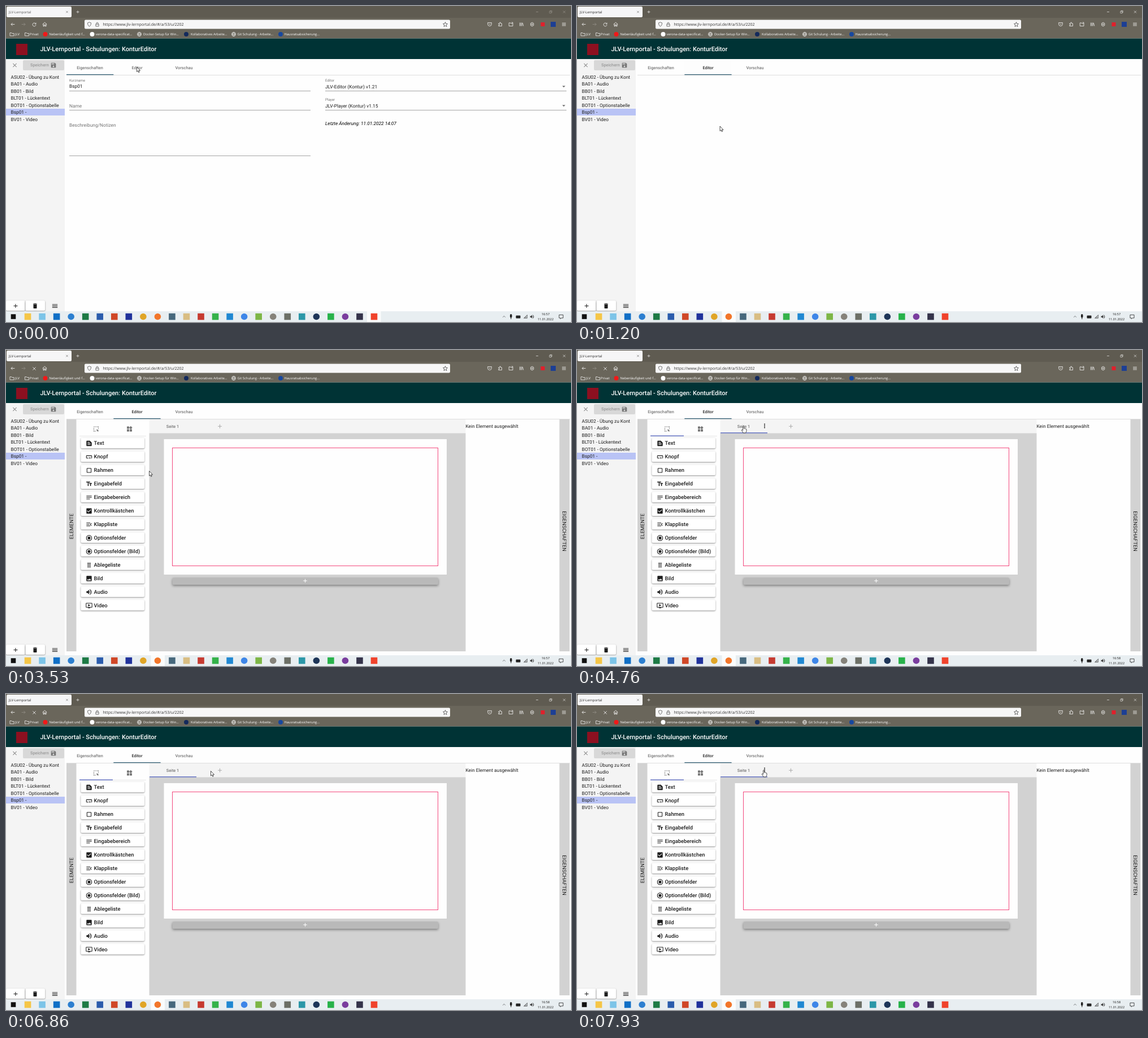
An HTML page with a canvas that plays this animation: 1000x560 px, repeating every 8 s.

```html
<!DOCTYPE html>
<html lang="de">
<head>
<meta charset="utf-8">
<title>JLV-Lernportal</title>
<style>
html, body { margin: 0; width: 100%; height: 100%; overflow: hidden; background: #fefefe; }
canvas { display: block; width: 1000px; height: 560px; }
</style>
</head>
<body>
<canvas id="stage" width="1000" height="560"></canvas>
<script>
const LOOP = 8000;
const ctx = document.getElementById('stage').getContext('2d');
const ROBOTO = 'Roboto, sans-serif';
const UI = '"Open Sans", sans-serif';
const GREY = '#757575', DARK = '#1d1d1d', STRIP = '#d2d2d2';

// Icon outlines on a 24 unit grid
const ICON = {
  close: 'M19 6.4L17.6 5 12 10.6 6.4 5 5 6.4 10.6 12 5 17.6 6.4 19 12 13.4 17.6 19 19 17.6 13.4 12z',
  save: 'M17 3H5c-1.1 0-2 .9-2 2v14c0 1.1.9 2 2 2h14c1.1 0 2-.9 2-2V7l-4-4zm-5 16c-1.66 0-3-1.34-3-3s1.34-3 3-3 3 1.34 3 3-1.34 3-3 3zm3-10H5V5h10v4z',
  trash: 'M6 19c0 1.1.9 2 2 2h8c1.1 0 2-.9 2-2V7H6v12zM19 4h-3.5l-1-1h-5l-1 1H5v2h14V4z',
  menu: 'M3 18h18v-2H3v2zm0-5h18v-2H3v2zm0-7v2h18V6H3z',
  add: 'M19 13h-6v6h-2v-6H5v-2h6V5h2v6h6v2z',
  text: 'M20.4 8.4l-4.8-4.8c-.4-.4-.9-.6-1.4-.6H5c-1.1 0-2 .9-2 2v14c0 1.1.9 2 2 2h14c1.1 0 2-.9 2-2V9.8c0-.5-.2-1-.6-1.4zM7 7h7v2H7V7zm10 10H7v-2h10v2zm0-4H7v-2h10v2z',
  button: 'M22 9v6c0 1.1-.9 2-2 2h-1v-2h1V9H4v6h6v2H4c-1.1 0-2-.9-2-2V9c0-1.1.9-2 2-2h16c1.1 0 2 .9 2 2zM14.5 19l1.1-2.4 2.4-1.1-2.4-1.1-1.1-2.4-1.1 2.4-2.4 1.1 2.4 1.1z',
  frame: 'M18 4H6c-1.1 0-2 .9-2 2v12c0 1.1.9 2 2 2h12c1.1 0 2-.9 2-2V6c0-1.1-.9-2-2-2zm0 14H6V6h12v12z',
  field: 'M2.5 4v3h5v12h3V7h5V4h-13zm19 5h-9v3h3v7h3v-7h3V9z',
  area: 'M3 18h12v-2H3v2zM3 6v2h18V6H3zm0 7h18v-2H3v2z',
  check: 'M19 3H5c-1.1 0-2 .9-2 2v14c0 1.1.9 2 2 2h14c1.1 0 2-.9 2-2V5c0-1.1-.9-2-2-2zm-9 14l-5-5 1.4-1.4L10 14.2l7.6-7.6L19 8l-9 9z',
  list: 'M3 18h13v-2H3v2zM3 6v2h13V6H3zm0 7h10v-2H3v2zm18 2.6L17.4 12 21 8.4 19.6 7l-5 5 5 5z',
  radio: 'M12 7c-2.76 0-5 2.24-5 5s2.24 5 5 5 5-2.24 5-5-2.24-5-5-5zm0-5C6.48 2 2 6.48 2 12s4.48 10 10 10 10-4.48 10-10S17.52 2 12 2zm0 18c-4.42 0-8-3.58-8-8s3.58-8 8-8 8 3.58 8 8-3.58 8-8 8z',
  drop: 'M7 4h4v4H7zM13 4h4v4h-4zM7 10h4v4H7zM13 10h4v4h-4zM7 16h4v4H7zM13 16h4v4h-4z',
  image: 'M21 19V5c0-1.1-.9-2-2-2H5c-1.1 0-2 .9-2 2v14c0 1.1.9 2 2 2h14c1.1 0 2-.9 2-2zM8.5 13.5l2.5 3L14.5 12l4.5 6H5z',
  audio: 'M3 9v6h4l5 5V4L7 9H3zm13.5 3c0-1.8-1-3.3-2.5-4v8c1.5-.7 2.5-2.2 2.5-4zM14 3.2v2.1c2.9.9 5 3.5 5 6.7s-2.1 5.8-5 6.7v2.1c4-.9 7-4.5 7-8.8s-3-7.9-7-8.8z',
  video: 'M21 3H3c-1.1 0-2 .9-2 2v12c0 1.1.9 2 2 2h5v2h8v-2h5c1.1 0 2-.9 2-2V5c0-1.1-.9-2-2-2zm0 14H3V5h18v12zm-5-6l-7 4V7z',
  widgets: 'M13 13v8h8v-8h-8zM3 21h8v-8H3v8zM3 3v8h8V3H3zm13.7-1.3L11 7.3l5.7 5.7 5.6-5.7z',
  select: 'M3 3h3v2H3zM8 3h3v2H8zM13 3h3v2h-3zM18 3h3v3h-3zM3 8h2v3H3zM3 13h2v3H3zM3 18h3v3H3zM8 19h3v2H8zM19 8h2v3h-2zM13 13l9 3-3.5 1.5 3 3-1.2 1.2-3-3L16 22z',
  more: 'M10 4h4v4h-4zM10 10h4v4h-4zM10 16h4v4h-4z'
};
// Line icons on the same grid
const LINE = {
  back: 'M21 12H4M11 5l-7 7 7 7',
  forward: 'M3 12h17M13 5l7 7-7 7',
  reload: 'M19 8A8 8 0 1 0 20 13M20 3v6h-6',
  cross: 'M5 5l14 14M19 5L5 19',
  home: 'M3 12L12 4l9 8M6 10v10h4v-6h4v6h4V10',
  shield: 'M12 2l8 3c0 8-2 13-8 17C6 18 4 13 4 5z',
  lock: 'M5 11h14v10H5zM8 11V7a4 4 0 0 1 8 0v4',
  star: 'M12 2l3 7 7 .6-5.400 4.800L18.300 22 12 18 5.700 22l1.700-7.600L2 9.600 9 9z',
  pocket: 'M3 4h18v7a9 9 0 0 1-18 0zM8 9l4 4 4-4',
  puzzle: 'M4 8h5V5a2 2 0 0 1 5 0v3h5v12H4v-4h2a2 2 0 0 0 0-5H4z',
  box: 'M3 5h7l2 3h9v12H3zM15 3h6v5',
  books: 'M4 4v16M9 4v16M14 4v16M17 5l4 15',
  gear: 'M12 3l7 4v10l-7 4-7-4V7zM9 12a3 3 0 1 0 6 0a3 3 0 1 0-6 0',
  burger: 'M3 6h18M3 12h18M3 18h18',
  globe: 'M2 12a10 10 0 1 0 20 0a10 10 0 1 0-20 0M2 12h20M12 2C6 8 6 16 12 22C18 16 18 8 12 2',
  folder: 'M2 5h8l2 3h10v12H2z',
  plus: 'M12 4v16M4 12h16',
  minus: 'M4 12h16',
  restore: 'M4 8h12v12H4zM8 8V4h12v12h-4',
  up: 'M4 16l8-8 8 8',
  wifi: 'M3 20L21 3v17zM9 20v-6M15 20V9',
  note: 'M3 4h18v14h-8l-4 4v-4H3z'
};
const shapes = {};
const shape = d => shapes[d] || (shapes[d] = new Path2D(d));

function rect(x, y, w, h, color) {
  ctx.fillStyle = color;
  ctx.fillRect(x, y, w, h);
}
function round(x, y, w, h, r, color) {
  ctx.fillStyle = color;
  ctx.beginPath();
  ctx.roundRect(x, y, w, h, r);
  ctx.fill();
}
function dot(x, y, r, color) {
  ctx.fillStyle = color;
  ctx.beginPath();
  ctx.arc(x, y, r, 0, 7);
  ctx.fill();
}
// Text whose capitals are centred on y
function label(s, x, y, size, color, style = '400', family = ROBOTO, align = 'left') {
  ctx.font = `${style} ${size}px ${family}`;
  ctx.textAlign = align;
  ctx.fillStyle = color;
  ctx.fillText(s, x, y + size * 0.36);
}
function icon(name, x, y, size, color, width = 2) {
  ctx.save();
  ctx.translate(x - size / 2, y - size / 2);
  ctx.scale(size / 24, size / 24);
  if (ICON[name]) {
    ctx.fillStyle = color;
    ctx.fill(shape(ICON[name]));
  } else {
    ctx.strokeStyle = color;
    ctx.lineWidth = width;
    ctx.stroke(shape(LINE[name]));
  }
  ctx.restore();
}
function shadow(blur, dy, alpha) {
  ctx.shadowColor = `rgba(0,0,0,${alpha})`;
  ctx.shadowBlur = blur;
  ctx.shadowOffsetY = dy;
}
function raised(x, y, w, h, color) {
  ctx.save();
  shadow(2.5, 1, 0.45);
  round(x, y, w, h, 2, color);
  ctx.restore();
}
const clamp = v => Math.min(1, Math.max(0, v));
const smooth = v => v < 0.5 ? 4 * v ** 3 : 1 - (2 - 2 * v) ** 3 / 2;

function browser(t) {
  const active = t >= 400, ctl = active ? '#fff' : '#a5a199';
  rect(0, 0, 1000, 21, '#5f5b51');
  rect(0, 21, 1000, 36.5, '#6a665b');
  round(1, 1, 115, 19, 2, '#f6f6f7');
  label('JLV-Lernportal', 5, 10.5, 6, active ? '#222' : '#555', '400', UI);
  icon('cross', 108, 10.5, 6, '#333');
  icon('plus', 127, 10.5, 7.5, '#fff');
  icon('minus', 940, 10.5, 6, ctl, 2.500);
  icon('restore', 964, 10.5, 6.5, ctl);
  icon('cross', 988, 10.5, 7, ctl);

  icon('back', 12, 32.5, 9, '#fff');
  icon('forward', 31, 32.5, 9, '#96928a');
  icon(t < 2500 ? 'reload' : 'cross', 50, 33, 9, '#fff');
  icon('home', 68.5, 32.5, 10, '#fff');
  round(139, 24.5, 647, 16, 2, '#f7f7f7');
  icon('shield', 147.5, 32.5, 9, '#444');
  icon('lock', 161.5, 32.5, 9, '#444');
  label('https://www.jlv-lernportal.de/#/a/53/u/2202', 171.5, 32.8, 7, '#333', '400', UI);
  icon('star', 777.5, 32.5, 9.5, '#444');
  ['pocket', 'puzzle', 'box', 'books', 'gear'].forEach((n, i) => icon(n, 856 + i * 18.8, 32.5, 9, '#fff'));
  rect(946.5, 29, 7, 7, '#e0202c');
  rect(964, 28, 9, 9, '#1d3f94');
  icon('burger', 987.5, 32.5, 9, '#fff');

  const marks = [
    [10.5, 16, 'JLV', 'folder'], [37, 42, 'Privat', 'folder'],
    [69.5, 76.5, 'Nebenläufigkeit und f...', '#f21818'],
    [152.5, 158.5, 'verona-data-specificat...', '#fff'],
    [236, 243, 'Docker-Setup für Win...', 'globe'],
    [319, 327, 'Kollaboratives Arbeite...', '#142a5c'],
    [403, 409.5, 'Git Schulung - Arbeite...', 'globe'],
    [486, 492.5, 'Hausratsabsicherung...', '#17479e']
  ];
  for (const [ix, tx, name, mark] of marks) {
    if (LINE[mark]) icon(mark, ix, 50, 8.5, '#fff');
    else dot(ix, 50, 4, mark);
    label(name, tx, 50.3, 5.85, '#fff', '400', UI);
  }
}

function header() {
  rect(0, 57.5, 1000, 36.5, '#003335');
  rect(18, 67, 20, 20, '#8c1020');
  label('JLV-Lernportal - Schulungen: KonturEditor', 60.5, 76, 11, '#fff', '500');
}

function sidebar() {
  rect(0, 94, 104, 447, '#f4f4f4');
  icon('close', 15.5, 105, 12, '#8b8b8b');
  round(30, 96, 73, 18, 2, '#d8d8d8');
  label('Speichern', 43, 104.8, 7.3, '#989898', '500');
  icon('save', 84, 105, 11.5, '#757575');
  rect(0, 182, 104, 12, '#b9c3f5');
  ['ASU02 - Übung zu Kont', 'BA01 - Audio', 'BB01 - Bild', 'BLT01 - Lückentext',
    'BOT01 - Optionstabelle', 'Bsp01 -', 'BV01 - Video']
    .forEach((s, i) => label(s, 8.5, 125.8 + i * 12.48, 8.33, DARK));
  raised(0, 522, 33.5, 18, '#fff');
  raised(34.5, 522, 34.5, 18, '#fff');
  icon('add', 17, 531.5, 12, DARK);
  icon('trash', 51.5, 531.5, 12, DARK);
  icon('menu', 86.5, 531.5, 12.5, DARK);
}

function tabs(t) {
  rect(107, 122, 891, 1, '#dedede');
  if (t > 400 && t < 1210) {
    const grow = 1 - (1 - clamp((t - 400) / 450)) ** 2.6;
    ctx.save();
    ctx.beginPath();
    ctx.rect(190, 97, 83.5, 25);
    ctx.clip();
    dot(231.5, 110, 44 * grow, `rgba(0,0,0,${0.11 * (1 - clamp((t - 850) / 360))})`);
    ctx.restore();
  }
  label('Eigenschaften', 148.5, 109.5, 7.3, GREY, '500', ROBOTO, 'center');
  label('Editor', 232, 109.5, 7.3, t < 400 ? GREY : '#2a2a2a', '500', ROBOTO, 'center');
  label('Vorschau', 315, 109.5, 7.3, GREY, '500', ROBOTO, 'center');
  rect(107 + 83.3 * smooth(clamp((t - 545) / 500)), 121, 83.3, 1.2, '#2c5a70');
}

function form() {
  const line = (x, y) => rect(x, y, 427, 0.8, '#8e8e8e');
  label('Kurzname', 112, 131.3, 6.25, GREY);
  label('Bsp01', 112, 142.5, 8.33, DARK);
  label('Name', 112, 176.8, 8.33, GREY);
  label('Beschreibung/Notizen', 112, 210.6, 8.33, GREY);
  [150.3, 184.3, 265].forEach(y => line(112, y));
  [['Editor', 'JLV-Editor (Kontur) v1.21'], ['Player', 'JLV-Player (Kontur) v1.15']].forEach(([a, b], i) => {
    const y = i * 34;
    label(a, 565, 131.3 + y, 6.25, GREY);
    label(b, 565, 143 + y, 8.33, DARK);
    line(565, 150.3 + y);
    ctx.fillStyle = '#666';
    ctx.beginPath();
    ctx.moveTo(984.5, 141.5 + y);
    ctx.lineTo(990, 141.5 + y);
    ctx.lineTo(987.2, 144.3 + y);
    ctx.fill();
  });
  label('Letzte Änderung: 11.01.2022 14:07', 565, 208.5, 8.33, '#000', 'italic 400');
}

function upright(s, x, y, turn) {
  ctx.save();
  ctx.translate(x, y);
  ctx.rotate(turn * Math.PI / 2);
  label(s, 0, 0, 9.1, DARK, '400', ROBOTO, 'center');
  ctx.restore();
}

function editor(t, p) {
  rect(107, 122, 17.5, 412, STRIP);
  rect(979.5, 122, 18, 412, STRIP);
  upright('ELEMENTE', 116, 312.5, -1);
  upright('EIGENSCHAFTEN', 988, 321, 1);

  icon('select', 159.5, 140, 12, GREY);
  icon('widgets', 218.5, 140, 12, GREY);
  rect(130, 152.3, 118, 0.7, '#dedede');
  const items = {
    Text: 'text', Knopf: 'button', Rahmen: 'frame', Eingabefeld: 'field', Eingabebereich: 'area',
    'Kontrollkästchen': 'check', Klappliste: 'list', Optionsfelder: 'radio', 'Optionsfelder (Bild)': 'radio',
    Ablegeliste: 'drop', Bild: 'image', Audio: 'audio', Video: 'video'
  };
  Object.entries(items).forEach(([name, pic], i) => {
    const y = 165 + i * 23.95;
    raised(132.5, y - 9.5, 112.5, 18.7, '#fff');
    icon(pic, 147, y + 0.5, 12.5, DARK);
    label(name, 155.5, y, 9.375, DARK, '500');
  });

  rect(253.5, 122, 560, 26, '#f4f4f4');
  rect(253.5, 147.5, 560, 386.5, STRIP);
  label('Seite 1', 295, 135, 7.3, GREY, '500', ROBOTO, 'center');
  icon('add', 378.5, 135.2, 12, '#aaa');
  if (overPage(p)) icon('more', 332, 134.5, 12, '#444');
  if (t >= 3700) {
    rect(130, 151.6, 59, 1.2, '#3f51b5');
    rect(254, 146.3, 83, 1.2, '#3f51b5');
  }
  rect(279.5, 158, 500.5, 240, '#fefefe');
  ctx.strokeStyle = '#f4477c';
  ctx.lineWidth = 1;
  ctx.strokeRect(294.5, 173.5, 470, 209);
  ctx.save();
  shadow(4, 2, 0.4);
  round(294.5, 403.5, 470.5, 12.5, 2, '#b9b9b9');
  ctx.restore();
  icon('add', 529.5, 409, 11.5, '#fff');
  label('Kein Element ausgewählt', 813.5, 135.5, 8.33, DARK);
}

function taskbar(t) {
  rect(0, 541, 1000, 19, '#e8eef1');
  rect(t < 400 ? 639 : 256.5, 541, 24.5, 19, '#fafcfc');
  const colors = ['#111', '#f5c647', '#7cc4e8', '#0f6fc6', '#2c7fd0', '#1d7a45', '#2a5cac', '#d04727', '#20329b',
    '#e0a526', '#f2762a', '#47687c', '#d9bd83', '#c63a30', '#34b24a', '#2088d2', '#3e86e8', '#7db646',
    '#85827a', '#6c6f66', '#2b97a8', '#1e3558', '#27b24a', '#7a3d9e', '#34334a', '#f0432c'];
  const discs = [4, 9, 10, 16, 18, 21, 23];
  colors.forEach((c, i) => {
    const x = 13 + i * 25.54, r = i ? 5.8 : 4.3;
    if (discs.includes(i)) dot(x, 550.5, r, c);
    else rect(x - r, 550.5 - r, 2 * r, 2 * r, c);
  });
  icon('up', 881.5, 550.5, 7, '#222');
  round(892, 546, 3.500, 6.500, 1.7, '#222');
  rect(893.3, 552, 1, 3, '#222');
  round(902.5, 548.5, 8, 5, 1, '#222');
  icon('wifi', 919.5, 550.5, 8, '#333');
  icon('audio', 931, 550.5, 9, '#333');
  label(t < 4400 ? '16:57' : '16:58', 955, 546, 5.5, '#111', '400', UI, 'center');
  label('11.01.2022', 955, 555, 5.5, '#111', '400', UI, 'center');
  icon('note', 982.5, 550.5, 9.5, '#222');
}

// Pointer stops: time, x, y
const STOPS = [
  [0, 231.5, 108], [700, 231.5, 108], [1200, 253, 213], [1260, 253.5, 214.5], [4060, 253.5, 214.5],
  [4330, 162, 152], [4420, 164, 140], [4760, 294.5, 134.5], [6200, 294.5, 134.5],
  [6860, 362.5, 136.5], [7000, 378, 137], [7100, 381.5, 137], [7330, 300, 136],
  [7560, 320.5, 136], [7760, 320.5, 136], [7930, 330.5, 134.5], [LOOP, 330.5, 134.5]
];
function pointer(t) {
  const i = STOPS.findIndex(s => s[0] > t);
  const [t0, x0, y0] = STOPS[i - 1], [t1, x1, y1] = STOPS[i];
  const u = (t - t0) / (t1 - t0), k = u * u * (3 - 2 * u);
  return { x: x0 + (x1 - x0) * k, y: y0 + (y1 - y0) * k };
}
function overPage(p) {
  return p.x > 254 && p.x < 337 && p.y < 148;
}
function isHand(t, p) {
  if (t < 3530) return t >= 160 && p.y < 122;
  return overPage(p) || (p.x > 130 && p.x < 246) || (p.x > 371 && p.x < 387);
}
const ARROW = 'M0 0V8.5L2 6.8 3.300 9.800 4.600 9.200 3.400 6.400H6z';
const HAND = 'M-.9.9Q0-.5.9.9V4.6Q1.8 3.9 2.500 5 3.400 4.400 4 5.300 5.400 5 5.400 6.600V9Q5 11 4 12.400H-.4Q-1.500 10-3.200 7.800-3.200 6.400-1.900 7L-.9 8z';
function drawPointer(t, p) {
  const path = shape(isHand(t, p) ? HAND : ARROW);
  ctx.save();
  ctx.translate(p.x, p.y);
  ctx.fillStyle = '#fff';
  ctx.fill(path);
  ctx.strokeStyle = '#222';
  ctx.lineWidth = 0.8;
  ctx.stroke(path);
  ctx.restore();
}

function draw(now) {
  const t = now % LOOP, p = pointer(t);
  ctx.textRendering = 'geometricPrecision';
  rect(0, 0, 1000, 560, '#fefefe');
  browser(t);
  header();
  sidebar();
  if (t < 560) form();
  if (t >= 3530) editor(t, p);
  tabs(t);
  taskbar(t);
  drawPointer(t, p);
}
let start;
function loop(now) {
  if (start === undefined) start = now;
  draw(Math.max(0, now - start));
  requestAnimationFrame(loop);
}
requestAnimationFrame(loop);
</script>
</body>
</html>
```
